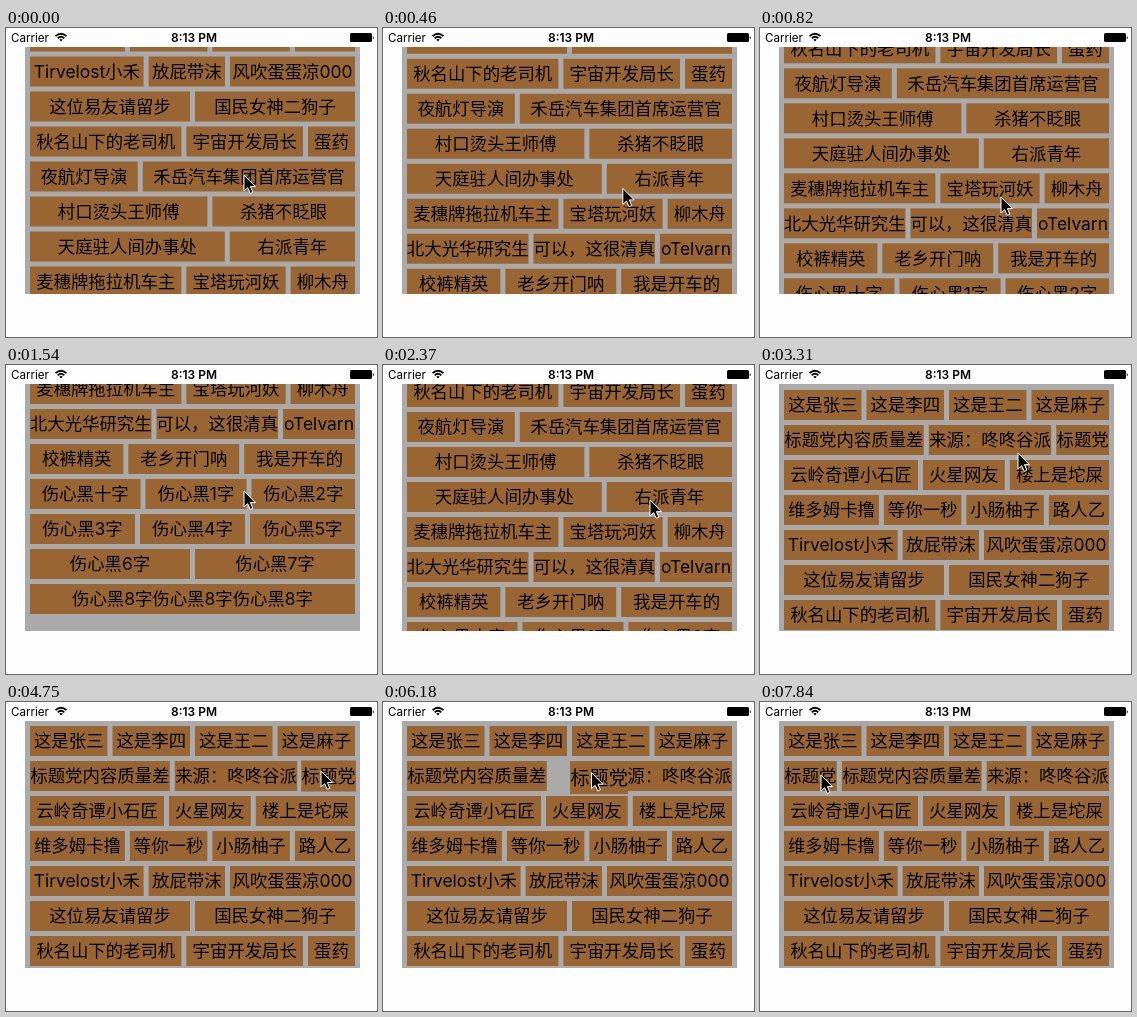
Recreate the animation shown at these times as an HTML page. Size 371 px wide and 309 px high, loop 8 s.

```html
<!DOCTYPE html>
<html lang="zh-CN">
<head>
<meta charset="utf-8">
<style>
  html, body { margin: 0; width: 100%; height: 100%; overflow: hidden; background: #fefefe; }
  svg { display: block; width: 371px; height: 309px; }
  text { font-family: Inter, "Noto Sans CJK SC", "Noto Sans CJK", sans-serif; }
  .tag text { font-size: 17.4px; text-anchor: middle; }
  .tag rect { fill: #996633; }
</style>
</head>
<body>
<svg viewBox="0 0 371 309">
  <defs><clipPath id="view"><rect x="19" y="19" width="335" height="247"/></clipPath></defs>
  <rect x="19" y="19" width="335" height="247" fill="#aaa"/>
  <g clip-path="url(#view)"><g id="list"></g></g>
  <text x="5" y="13.5" font-size="11.6">Carrier</text>
  <g fill="none" stroke="#000" stroke-width="1.8">
    <path d="M49.5 8.2Q55 3.2 60.5 8.2M51.7 10.3Q55 7.3 58.3 10.3"/>
    <path d="M53.3 11.6Q55 10.2 56.7 11.6L55 13.6Z" fill="#000" stroke="none"/>
  </g>
  <text x="188" y="13.5" font-size="12" font-weight="600" text-anchor="middle">8:13 PM</text>
  <rect x="344" y="5" width="22" height="9" rx="1.5"/>
  <path d="M366.8 7.5q1.8 2 0 4z"/>
  <path id="cursor" d="M0 0V16L3.7 12.7 6.3 18.4 8.9 17.2 6.4 11.6H11.4Z" stroke="#fff" stroke-width="1"/>
</svg>
<script>
const LOOP = 8000, STEP = 118.8, LAST_STEP = 66;
const LEFT = 24, TOP = 24, WIDTH = 325, HEIGHT = 30, GAP = 5;
const EM = 17.4;

const ROWS = [
  '这是张三 这是李四 这是王二 这是麻子',
  '标题党内容质量差 来源：咚咚谷派 标题党',
  '云岭奇谭小石匠 火星网友 楼上是坨屎',
  '维多姆卡撸 等你一秒 小肠柚子 路人乙',
  'Tirvelost小禾 放屁带沫 风吹蛋蛋凉000',
  '这位易友请留步 国民女神二狗子',
  '秋名山下的老司机 宇宙开发局长 蛋药',
  '夜航灯导演 禾岳汽车集团首席运营官',
  '村口烫头王师傅 杀猪不眨眼',
  '天庭驻人间办事处 右派青年',
  '麦穗牌拖拉机车主 宝塔玩河妖 柳木舟',
  '北大光华研究生 可以，这很清真 oTelvarn',
  '校裤精英 老乡开门呐 我是开车的',
  '伤心黑十字 伤心黑1字 伤心黑2字',
  '伤心黑3字 伤心黑4字 伤心黑5字',
  '伤心黑6字 伤心黑7字',
  '伤心黑8字伤心黑8字伤心黑8字'
];

const linear = p => p;
const easeOut = p => 1 - (1 - p) ** 2;
const smooth = p => p * p * (3 - 2 * p);

// Keys are [time, ...values, optional easing into that key].
function track(keys, t) {
  let a = keys[0];
  for (const b of keys) {
    if (t < b[0]) {
      const ease = typeof b.at(-1) === 'function' ? b.at(-1) : smooth;
      const p = ease((t - a[0]) / (b[0] - a[0]));
      return a.slice(1).map((v, i) => typeof v === 'number' ? v + (b[i + 1] - v) * p : v);
    }
    a = b;
  }
  return a.slice(1);
}
const ramp = (t, from, to) => smooth(Math.min(1, Math.max(0, (t - from) / (to - from))));

const SCROLL = [
  [0, 135.5], [1069, 233.5, easeOut], [1190, 233.5],
  [1544, 365, linear], [1700, 353], [2138, 223, easeOut], [2260, 223], [2376, 222],
  [2960, -10, easeOut], [3326, -1, easeOut], [3500, 0]
];
const POINTER = [
  [0, 238, 147], [832, 241, 169], [1190, 241, 169], [1544, 238, 126], [1700, 238, 124],
  [1900, 244, 160], [2138, 267, 133], [2260, 267, 133], [2376, 267, 135],
  [2650, 266, 182], [2950, 264, 178], [3326, 258, 88], [3920, 313, 70], [4040, 315, 69],
  [5150, 315, 69], [5880, 284, 70], [6420, 153, 71], [6940, 153, 71],
  [7300, 110, 86], [7720, 64, 77], [7840, 61, 73]
];

const charWidth = c => c > '\u2000' ? EM : c === '1' ? 8 : 'filrt'.includes(c) ? 5 : 10.4;
const textWidth = s => [...s].reduce((sum, c) => sum + charWidth(c), 0);

function make(name, attrs, parent) {
  const el = document.createElementNS('http://www.w3.org/2000/svg', name);
  for (const key in attrs) el.setAttribute(key, attrs[key]);
  return parent.appendChild(el);
}

const list = document.getElementById('list');
const cursor = document.getElementById('cursor');

function makeTag(label, x, y, width) {
  const el = make('g', { class: 'tag' }, list);
  make('rect', { x: -width / 2, y: -HEIGHT / 2, width, height: HEIGHT }, el);
  make('text', { y: 6.3 }, el).textContent = label;
  const tag = { el, width, cx: x + width / 2, cy: y + HEIGHT / 2 };
  place(tag, 0, 0);
  return tag;
}
function place(tag, dx, dy, scale = 1) {
  tag.el.setAttribute('transform', `translate(${tag.cx + dx} ${tag.cy + dy}) scale(${scale})`);
}

// Spare width in each row is shared equally between its tags.
const grid = ROWS.map((row, r) => {
  const labels = row.split(' ');
  const free = WIDTH - GAP * (labels.length - 1);
  const pad = (free - textWidth(labels.join(''))) / labels.length;
  let x = LEFT;
  return labels.map(label => {
    const width = textWidth(label) + pad;
    const tag = makeTag(label, x, TOP + r * (HEIGHT + GAP), width);
    x += width + GAP;
    return tag;
  });
});

const [first, second, dragged] = grid[1];
list.append(dragged.el);
const shift = dragged.width + GAP;
const homeShift = LEFT + dragged.width / 2 - dragged.cx;

function draw(t) {
  const [scroll] = track(SCROLL, t);
  const [x, y] = track(POINTER, t);
  list.setAttribute('transform', `translate(0 ${-scroll})`);
  cursor.setAttribute('transform', `translate(${x} ${y})`);

  place(second, shift * ramp(t, 5880, 6180), 0);
  place(first, shift * ramp(t, 6350, 6650), 0);

  const held = t > 4680;
  const drop = ramp(t, 6480, 6760);
  const dx = held ? x - 315 : 0, dy = held ? y - 69 : 0;
  const lift = ramp(t, 4680, 4860) * (1 - drop);
  place(dragged, dx + (homeShift - dx) * drop, dy * (1 - drop), 1 + 0.1 * lift);
}

const start = performance.now();
function tick() {
  const t = (performance.now() - start) % LOOP;
  draw(Math.min(LAST_STEP, Math.floor((t + 20) / STEP)) * STEP);
  requestAnimationFrame(tick);
}
tick();
</script>
</body>
</html>
```
